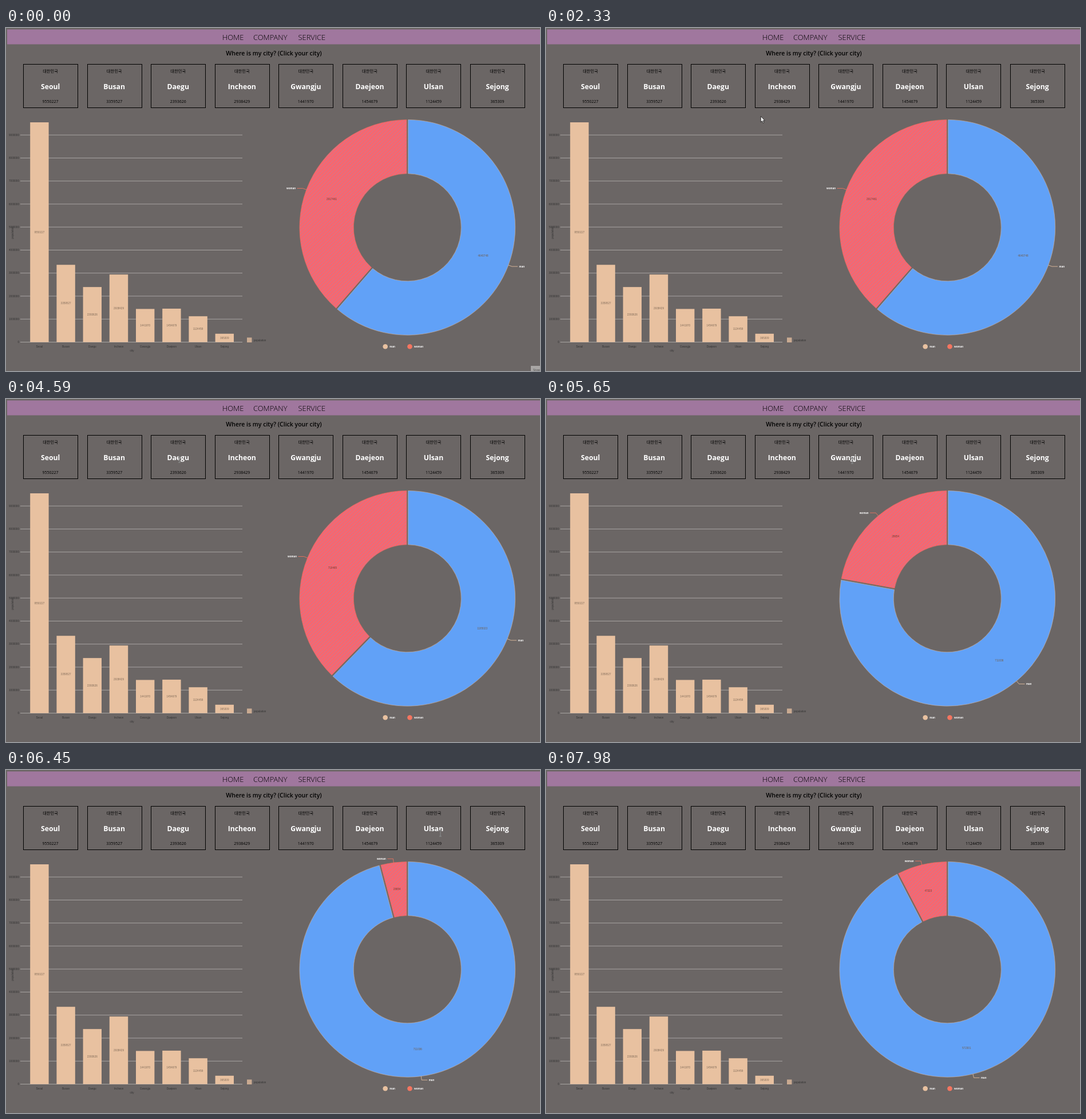
An HTML page for the animation above (8 s loop, 933x600 px).

```html
<!DOCTYPE html>
<html lang="en">
<head>
<meta charset="utf-8">
<style>
html, body { margin: 0; width: 100%; height: 100%; overflow: hidden; background: #6b6665; }
svg { display: block; width: 100%; height: 100%; }
.ui { font-family: "Open Sans", "Noto Sans CJK KR", "Noto Sans CJK", sans-serif; }
.chart { font: 4.64px "Liberation Sans", sans-serif; fill: #333; }
.mid { text-anchor: middle; }
.end { text-anchor: end; }
.tag { font-weight: bold; fill: #fff; }
</style>
</head>
<body>
<svg id="stage" viewBox="0 0 933 600">
  <defs>
    <pattern id="hatch" width="4.2" height="4.2" patternUnits="userSpaceOnUse" patternTransform="rotate(45)">
      <rect width="4.2" height="4.2" fill="#ff6369"/>
      <rect width="2.1" height="4.2" fill="#e07080"/>
    </pattern>
  </defs>
  <rect width="933" height="600" fill="#6b6665"/>
</svg>
<script>
const LOOP = 8000;
const stage = document.getElementById('stage');

function add(tag, attrs, text, parent = stage) {
  const el = document.createElementNS('http://www.w3.org/2000/svg', tag);
  set(el, attrs);
  if (text !== undefined) el.textContent = text;
  return parent.appendChild(el);
}
function set(el, attrs) {
  for (const k in attrs) el.setAttribute(k, attrs[k]);
}
const label = (cls, x, y, text, more = {}) => add('text', { class: cls, x, y, ...more }, text);

// Header
add('rect', { x: 2, y: 2.5, width: 931, height: 26, fill: '#a0779e' });
[['HOME', 378], ['COMPANY', 432], ['SERVICE', 510.5]].forEach(([text, x]) =>
  label('ui', x, 21, text, { 'font-size': 12.9, 'font-weight': 300 }));
label('ui mid', 468, 48, 'Where is my city? (Click your city)', { 'font-size': 10.5, 'font-weight': 600 });

// City cards and bars
const cities = [['Seoul', 9550227], ['Busan', 3359527], ['Daegu', 2393626], ['Incheon', 2938429],
  ['Gwangju', 1441970], ['Daejeon', 1454679], ['Ulsan', 1124459], ['Sejong', 365309]];
const cardX = i => 77.6 + 111.57 * i;
const BASE = 549.5, MILLION = 40.26;

for (let i = 0; i < 10; i++) {
  const y = BASE - i * MILLION;
  add('path', { d: `M25 ${y}H413`, stroke: '#a9a5a3', 'stroke-width': 1 });
  label('chart end', 23, y + 1.6, i * 1e6);
}
cities.forEach(([name, count], i) => {
  const cx = cardX(i);
  add('rect', { x: Math.round(cx - 47.6) + .5, y: 63.5, width: 95, height: 76, fill: 'none', stroke: '#000' });
  label('ui mid', cx, 78, '대한민국', { 'font-size': 7.3 });
  label('ui mid', cx, 107, name, { 'font-size': 12.2, 'font-weight': 700, fill: '#fff' });
  label('ui mid', cx, 131, count, { 'font-size': 7 });

  const x = 42.2 + 46.2 * i, h = count / 1e6 * MILLION;
  add('rect', { x, y: BASE - h, width: 32.4, height: h, fill: '#e8c1a0' });
  label('chart mid', x + 16.2, BASE - h / 2 + 1.6, count, { style: 'fill:#836d5a' });
  label('chart mid', x + 16.2, 559, name);
});
label('chart mid', 220, 565.5, 'city');
label('chart mid', 0, 0, 'population', { transform: 'translate(13 358) rotate(-90)' });
add('rect', { x: 421, y: 541.5, width: 8.5, height: 8.5, fill: '#e8c1a0', opacity: .75 });
label('chart', 433, 547.5, 'population');

// Donut
const CX = 701.3, CY = 348.8, R0 = 94, R1 = 188.4, PAD = 1.29;
const polar = (deg, r) => {
  const a = deg * Math.PI / 180;
  return [CX + r * Math.sin(a), CY - r * Math.cos(a)];
};
function sector(a, b) {
  const inset = r => Math.asin(PAD / r) * 180 / Math.PI;
  const o = inset(R1), i = inset(R0), big = b - a > 180 ? 1 : 0;
  return `M${polar(a + o, R1)}A${R1} ${R1} 0 ${big} 1 ${polar(b - o, R1)}` +
    `L${polar(b - i, R0)}A${R0} ${R0} 0 ${big} 0 ${polar(a + i, R0)}Z`;
}
function makeSlice(name, fill, color, edge, ink) {
  const arc = add('path', { fill, stroke: edge, 'stroke-width': .6, 'stroke-linejoin': 'round' });
  const link = add('path', { fill: 'none', stroke: color, 'stroke-width': .84 });
  const tag = label('chart tag', 0, 0, name);
  const value = label('chart mid', 0, 0, '', { style: 'fill:' + ink });
  return (a, b, count) => {
    const mid = (a + b) / 2, side = mid < 180 ? 1 : -1;
    const [x, y] = polar(mid, R1 + 6.7), [vx, vy] = polar(mid, (R0 + R1) / 2);
    set(arc, { d: sector(a, b) });
    set(link, { d: `M${polar(mid, R1)}L${x} ${y}h${side * 10}` });
    set(tag, { x: x + side * 12.5, y: y + 1.6, 'text-anchor': side > 0 ? 'start' : 'end' });
    set(value, { x: vx, y: vy + 1.6 });
    value.textContent = count;
  };
}
const man = makeSlice('man', '#61a1f7', '#e8c1a0', '#d8b495', '#725f4e');
const woman = makeSlice('woman', 'url(#hatch)', '#f47560', '#e36d59', '#78392f');
[['man', 662.7, '#e8c1a0'], ['woman', 705.5, '#f47560']].forEach(([name, x, fill]) => {
  add('circle', { cx: x, cy: 557.2, r: 4.3, fill });
  label('chart tag', x + 7.6, 558.8, name);
});

// Click time, woman's angle, man and woman counts
const picks = [
  [-9999, 139, 4640748, 2917461],
  [4250, 135.8, 1185023, 719465],
  [5450, 14.5, 711036, 28654],
  [6850, 27.4, 572301, 47323]
];
function spring(ms) {
  if (ms <= 0) return 0;
  const t = ms / 1000, w = Math.sqrt(120 - 49);
  return 1 - Math.exp(-7 * t) * (Math.cos(w * t) + 7 / w * Math.sin(w * t));
}
function drawDonut(t) {
  let angle = picks[0][1], pick;
  for (const p of picks) {
    if (t < p[0]) break;
    pick = p;
    angle += (p[1] - angle) * spring(t - p[0] - 82);
  }
  man(0, 360 - angle, pick[2]);
  woman(360 - angle, 360, pick[3]);
}

// Recorder hint in the corner
const hint = add('g', {});
add('rect', { x: 917, y: 591, width: 16, height: 9, fill: '#a9a6a5' }, undefined, hint);
add('text', { class: 'ui', x: 921, y: 600, 'font-size': 6, fill: '#444' }, 'Stop', hint);

// Mouse: time, x, y
const path = [[530, 929, 595], [660, 922, 588], [1460, 922, 588], [1660, 862, 543], [1860, 749, 457],
  [2260, 392, 163], [2600, 312, 122], [2850, 298, 117], [3260, 298, 117], [3390, 303, 106],
  [4650, 303, 106], [5050, 513, 106], [5190, 535, 108], [5780, 535, 108], [6250, 740, 110],
  [6400, 759, 111], [7100, 759, 111], [7650, 835, 106], [7850, 850, 105], [LOOP, 850, 105]];
const arrow = add('path', {
  d: 'M0 0V10.2L2.3 8.1L3.9 11.8L5.5 11.1L3.9 7.5H7Z', fill: '#fff', stroke: '#000', 'stroke-width': .7
});
const beam = add('path', {
  d: 'M-2 -5H2M0 -5V5M-2 5H2', fill: 'none', stroke: '#fff', 'stroke-width': .8, style: 'mix-blend-mode:difference'
});
function drawMouse(t) {
  const i = path.findIndex(p => p[0] > t);
  arrow.style.display = beam.style.display = 'none';
  if (i < 1) return;
  const [t0, x0, y0] = path[i - 1], [t1, x1, y1] = path[i];
  const k = (t - t0) / (t1 - t0), x = x0 + (x1 - x0) * k, y = y0 + (y1 - y0) * k;
  const overName = y < 120 && cities.some((c, n) => Math.abs(x - cardX(n)) < 26);
  const shape = overName ? beam : arrow;
  shape.style.display = '';
  set(shape, { transform: `translate(${x} ${y})` });
}

function frame(now) {
  const t = now % LOOP;
  hint.style.display = t < 70 ? '' : 'none';
  drawDonut(t);
  drawMouse(t);
  requestAnimationFrame(frame);
}
frame(0);
</script>
</body>
</html>
```
